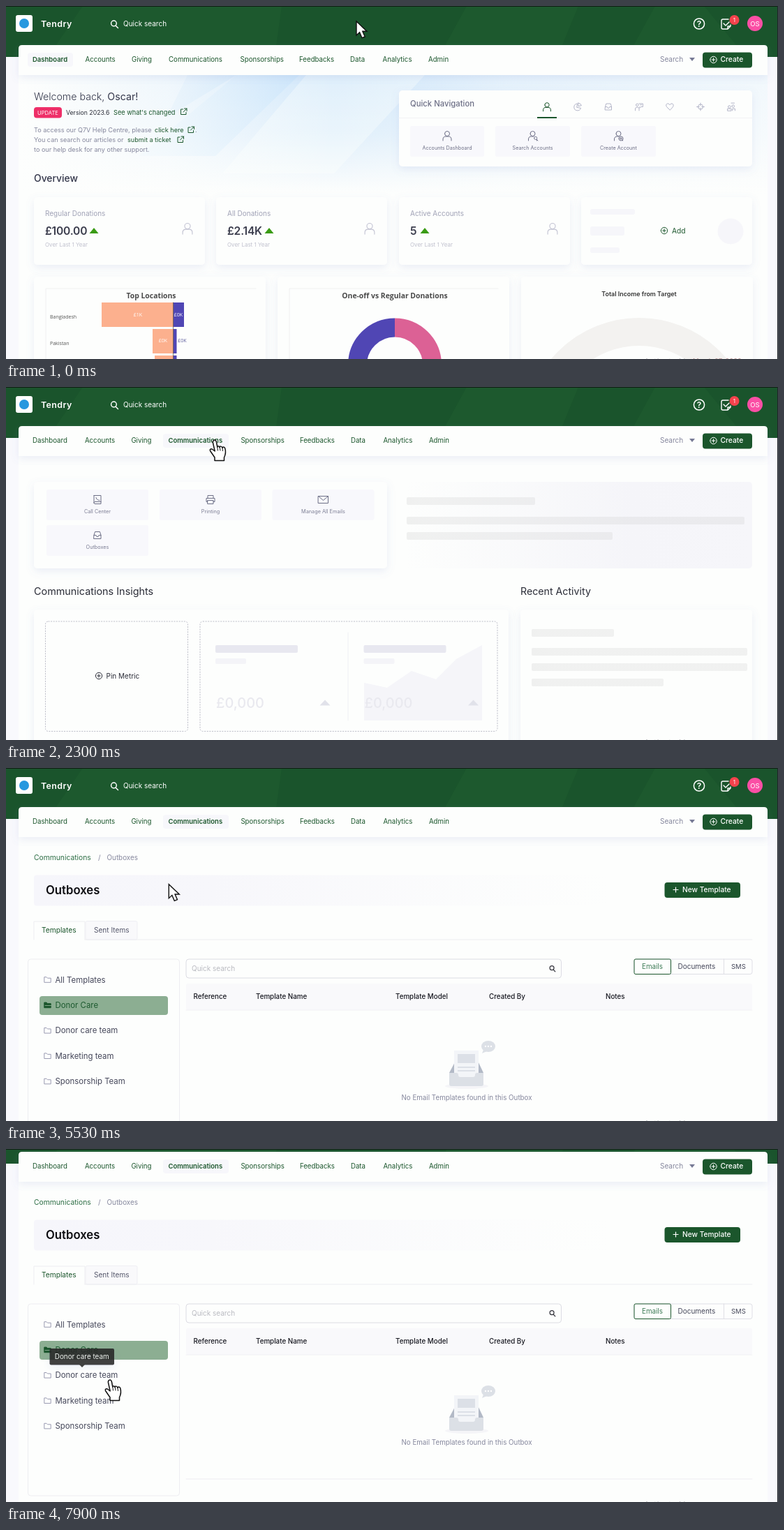
Animation, 1106 px wide and 506 px high, one loop 8000 ms. Source, as an HTML page:

```html
<!DOCTYPE html>
<html lang="en">
<head>
<meta charset="utf-8">
<title>Outboxes walkthrough</title>
<style>
html, body { margin: 0; width: 100%; height: 100%; overflow: hidden; background: #fdfefd; }
svg { display: block; width: 100vw; height: 100vh; }
text { font-family: Inter, sans-serif; white-space: pre; }
.alt { font-family: "Open Sans", sans-serif; }
</style>
</head>
<body>
<svg id="stage" viewBox="0 0 1106 506"></svg>
<script>
const GREEN = '#1b562c', WHITE = '#fdfefd', GREY = '#85879d', PALE = '#f8f8fc', INK = '#2b2d38', BLUE = '#318fe6';
const LOOP = 8000;

// Drawing helpers
const rect = (x, y, w, h, fill, r = 0, more = '') =>
  `<rect x="${x}" y="${y}" width="${w}" height="${h}" rx="${r}" fill="${fill}" ${more}/>`;
const text = (x, y, s, size, fill = INK, weight = 400, more = '') =>
  `<text x="${x}" y="${y}" font-size="${size}" fill="${fill}" font-weight="${weight}" ${more}>${s}</text>`;
const mid = (x, y, s, size, fill, weight, more = '') =>
  text(x, y, s, size, fill, weight, 'text-anchor="middle" ' + more);
const path = (d, fill, more = '') => `<path d="${d}" fill="${fill}" ${more}/>`;
const line = (d, color, w = 1, more = '') =>
  path(d, 'none', `stroke="${color}" stroke-width="${w}" stroke-linecap="round" stroke-linejoin="round" ${more}`);
const circle = (x, y, r, fill, more = '') => `<circle cx="${x}" cy="${y}" r="${r}" fill="${fill}" ${more}/>`;
const at = (x, y, s, k = 1) => `<g transform="translate(${x} ${y}) scale(${k})">${s}</g>`;
const group = (id, s) => `<g id="${id}">${s}</g>`;
const card = (x, y, w, h) => rect(x, y, w, h, WHITE, 5, 'filter="url(#shadow)"');
const bones = list => list.map(([x, y, w]) => rect(x, y, w, 11, 'url(#shimmer)', 2)).join('');

// Icons, centred on their own origin
const icon = {
  person: 'M-3.5-3A3.5 3.5 0 1 1 3.5-3A3.5 3.5 0 1 1-3.5-3M-6 7V5C-6 2-4 1-2 1H2C4 1 6 2 6 5V7',
  pie: 'M-1-5A5.5 5.5 0 1 0 5 2L-1 1ZM1-6V-1L6-2A5.5 5.5 0 0 0 1-6Z',
  box: 'M-5 0L-3.5-5H3.5L5 0V5H-5ZM-5 0H-2L-1 2H1L2 0H5',
  talk: 'M-5-3A2 2 0 1 1-1-3A2 2 0 1 1-5-3M-6 6V2Q-3-1 0 2V6M0-5H6V0H3L1 2V0M2-3H4',
  heart: 'M0 5L-5 0C-8-5-2-7 0-3C2-7 8-5 5 0Z',
  target: 'M-4 0A4 4 0 1 1 4 0A4 4 0 1 1-4 0M0-6V-2M0 6V2M-6 0H-2M6 0H2',
  people: 'M-5 0A2 2 0 1 1-1 0A2 2 0 1 1-5 0M-6 6V3H0V6ZM1-1A2 2 0 1 1 5-1A2 2 0 1 1 1-1M2 6V3H6V6M0-6H5',
  book: 'M-5-6H5V6H-4Q-6 4-4 3H5M-5-6V5M-2-3Q-1 1 3 1',
  printer: 'M-4-2V-6H4V-2M-4 3H-6V-2H6V3H4M-4 1H4V6H-4Z',
  mail: 'M-7-5H7V5H-7ZM-7-5L0 1L7-5',
  search: 'M-4-1A3.5 3.5 0 1 1 3-1A3.5 3.5 0 1 1-4-1M2 2L5 5',
  plus: 'M-4.7 0A4.7 4.7 0 1 1 4.7 0A4.7 4.7 0 1 1-4.7 0M-2.3 0H2.3M0-2.3V2.3',
  ext: 'M-1-3.5H-4V4H3.5V1M1-4.5H4.5V-1M4.5-4.5L-.5.5',
  folder: 'M-4.7 3.8V-3.8H-1.5L0-2.3H4.7V3.8Z'
};
const draw = (name, x, y, color, k = 1, w = 1) => at(x, y, line(icon[name], color, w), k);
const up = (x, y, color, w = 6.5) => path(`M${x - w} ${y + 4}L${x} ${y - 4}L${x + w} ${y + 4}Z`, color);

function defs() {
  const stop = (o, c, a = 1) => `<stop offset="${o}" stop-color="${c}" stop-opacity="${a}"/>`;
  return `<defs>
    <filter id="shadow" x="-10%" y="-20%" width="120%" height="150%"><feDropShadow dx="0" dy="4" stdDeviation="6" flood-color="#6a7cc4" flood-opacity=".13"/></filter>
    <linearGradient id="shimmer">${stop(.25, '#bebebe', .2)}${stop(.37, '#818181', .24)}${stop(.63, '#bebebe', .2)}</linearGradient>
    <linearGradient id="toRight">${stop(0, '#f5f5f9', 0)}${stop(.65, '#f5f5f9')}${stop(1, '#f6f6fa')}</linearGradient>
    <linearGradient id="toLeft">${stop(0, '#f6f6fb')}${stop(.25, '#f7f7fb')}${stop(.8, '#f9f9fc', 0)}</linearGradient>
    <linearGradient id="sky" x2="0" y2="1">${stop(0, '#cfe6fa')}${stop(.5, '#e0effb')}${stop(1, '#fdfefd')}</linearGradient>
    <linearGradient id="veil">${stop(0, '#fdfefd')}${stop(.2, '#fdfefd', .7)}${stop(.42, '#fdfefd', 0)}${stop(.65, '#fdfefd', .45)}${stop(1, '#fdfefd', .75)}</linearGradient>
  </defs>`;
}

function header() {
  const dark = d => path(d, '#0b3a1c', 'opacity=".14"');
  return rect(0, 0, 1106, 73, '#1d592e') +
    dark('M395 0H660L620 73H385Z') + dark('M820 0H930L890 73H790Z') + dark('M1000 0H1106V73H1060Z') + dark('M0 0H110L60 73H0Z') +
    rect(14, 13, 24, 24, '#fff', 3) + circle(26, 25, 7, '#2798df') +
    text(50, 30, 'Tendry', 12.4, '#fff', 600, 'letter-spacing=".4"') +
    draw('search', 155, 26, '#fff', 1.1, 1.3) + text(168, 29, 'Quick search', 10, '#fff') +
    circle(993, 25.5, 7.6, 'none', 'stroke="#fff" stroke-width="1.5"') + mid(993, 29.8, '?', 12, '#fff', 600) +
    line('M1038 27V29L1034 33H1027Q1025 33 1025 31V21Q1025 19 1027 19H1035M1028 25L1031 28L1036 23M1034 33V29H1038', '#fff', 1.4) +
    circle(1043.5, 20, 7, '#f5424c') + mid(1043.5, 23, '1', 8, '#fff') +
    circle(1073, 25, 11, '#fb4fa5') + mid(1073, 28.5, 'OS', 9.5, '#fff');
}

const NAV = [['Dashboard', 38], ['Accounts', 113.5], ['Giving', 180], ['Communications', 233], ['Sponsorships', 335.5],
  ['Feedbacks', 420], ['Data', 493], ['Analytics', 539.5], ['Admin', 605]];
function nav() {
  return path('M18 99V61Q18 56 23 56H1086Q1091 56 1091 61V99Z', WHITE, 'filter="url(#shadow)"') +
    `<rect id="pill" y="67" height="20" rx="4" fill="#f7f7fb"/>` +
    NAV.map(([s], i) => text(0, 80, s, 9.7, GREEN, 400, `id="nav${i}"`)).join('') +
    text(937, 80, 'Search', 10, GREY) + path('M979 74H987L983 79Z', '#777a95') +
    rect(998, 66.5, 71, 22, GREEN, 4) + draw('plus', 1013.5, 77, '#fff') + text(1023.5, 80.3, 'Create', 10.3, '#fff', 500);
}

function dashboard() {
  const sub = (y, a, x, b) => text(40, y, a, 9.1, GREY) + (b ? text(x, y, b, 9.1, GREEN) : '');
  const metric = (x, name, value, tri) => card(x, 274, 245, 97) + text(x + 16, 301, name, 10, '#a0a2b6') +
    text(x + 16, 328, value, 15.6, '#3b3d4d', 600, 'letter-spacing="-.2"') + up(tri, 322, '#3a9b14') +
    text(x + 16, 345, 'Over Last 1 Year', 8, '#c0c1ce') + draw('person', x + 220, 319, '#c3c4d3', 1.15);
  const tile = (x, w, kind, s) => rect(x, 172, w, 44, PALE, 3) + draw(kind, x + w / 2, 186, '#6d6f86') +
    mid(x + w / 2, 206, s, 7.2, '#6d6f86');
  const small = (x, y, s, fill) => mid(x, y, s, 7, fill, 400, 'class="alt"');
  const title = (x, s, size = 10.4) => mid(x, 419, s, size, '#4a4a4a', 700, 'class="alt"');
  const orange = '#fcb08e', violet = '#5046b4';
  return rect(18, 99, 1073, 170, 'url(#sky)') + path('M330 99H420L300 215H190Z', '#9fd0f8', 'opacity=".22"') +
    path('M430 99H600L470 240H310Z', WHITE, 'opacity=".35"') + path('M260 99H330L230 160Z', '#a5d0f5', 'opacity=".4"') +
    rect(18, 99, 1073, 171, 'url(#veil)') +
    text(40, 135, 'Welcome back, <tspan font-weight="400">Oscar!</tspan>', 14.2, '#33364a', 300) +
    rect(40, 145, 40, 15.5, '#ee2f68', 4) + mid(60, 155.7, 'UPDATE', 7.6, '#fff') +
    text(86, 155.5, 'Version 2023.6', 8.7) + text(154, 155.5, 'See what\'s changed', 9.2, GREEN) + draw('ext', 254.5, 151.5, GREEN) +
    sub(181, 'To access our Q7V Help Centre, please', 213, 'click here') + draw('ext', 265, 177.5, GREEN) + text(271, 181, '.', 9, GREY) +
    sub(195, 'You can search our articles or', 174, 'submit a ticket') + draw('ext', 250, 191.5, GREEN) +
    sub(209, 'to our help desk for any other support.') +
    text(40, 252, 'Overview', 13.9, '#33364a', 500) +
    card(563, 121, 506, 109) + text(579, 144, 'Quick Navigation', 11.3, '#6d6f86', 500) + line('M563 160.5H1069', '#f2f2f5') +
    ['person', 'pie', 'box', 'talk', 'heart', 'target', 'people'].map((k, i) =>
      draw(k, 775 + 44 * i, 144.5, i ? '#b3b5c8' : GREEN, .9, 1.1)).join('') + rect(761, 159, 28, 2, GREEN) +
    tile(579, 106, 'person', 'Accounts Dashboard') + tile(701, 107, 'person', 'Search Accounts') + tile(824, 107, 'person', 'Create Account') +
    circle(759, 189, 3, PALE) + draw('search', 759, 190, '#6d6f86', .6, 1.5) +
    circle(881, 189, 3, PALE) + draw('plus', 881, 190, '#6d6f86', .65, 1.5) +
    metric(40, 'Regular Donations', '£100.00', 126) + metric(301, 'All Donations', '£2.14K', 377) + metric(563, 'Active Accounts', '5', 600) +
    card(824, 274, 245, 97) + rect(837, 291, 64, 8, '#f6f6fa', 3) + rect(837, 316, 49, 13, '#f6f6fa', 3) + rect(837, 346, 42, 8, '#f6f6fa', 3) +
    circle(1038, 323, 18.5, '#f6f6fa') + draw('plus', 943, 322, GREEN) + text(954, 325.7, 'Add', 10.2, GREEN) +
    [40, 389, 738].map(x => card(x, 388, 332, 160)).join('') +
    line('M57 506V405H358M406 506V405H705', '#ececee', .8) +
    title(208, 'Top Locations') + title(557, 'One-off vs Regular Donations') + mid(907, 416, 'Total Income from Target', 8.9, '#333', 600) +
    text(63, 448, 'Bangladesh', 7, '#555', 400, 'class="alt"') + text(63, 486, 'Pakistan', 7, '#555', 400, 'class="alt"') +
    rect(137, 425, 103, 35, orange) + rect(240, 425, 15, 35, violet) + rect(210, 463, 30, 35, orange) + rect(240, 463, 4.5, 35, violet) +
    rect(213, 501, 27, 5, orange) + rect(240, 501, 4.5, 5, violet) + line('M239.5 425V506', '#444', .7) +
    small(189, 444.5, '£1K', '#fff') + small(247, 444.5, '£0K', '#fff') + small(225, 482, '£0K', '#fff') + small(252.5, 482, '£0K', '#5b5b9c') +
    line('M557 461A53.5 53.5 0 0 0 557 568', violet, 27, 'style="stroke-linecap:butt"') +
    line('M557 461A53.5 53.5 0 0 1 557 568', '#dc6195', 27, 'style="stroke-linecap:butt"') +
    circle(907, 611, 144, 'none', 'stroke="#f3f2f0" stroke-width="40"') +
    text(984, 511.5, 'March 07, 2022', 9.5, '#b58f8f');
}

function communications(ready) {
  const lift = ready ? 15 : 0, drop = ready ? 8 : 0, row2 = ready ? 194 : 198;
  const tile = (x, y, kind, s, id = '') => rect(x, y, 146, 44, PALE, 3, id) + draw(kind, x + 73, y + 14.5, '#6d6f86') +
    mid(x + 73, y + 33.5, s, 7.3, '#7d7f95');
  const figure = x => rect(x, 370, 118, 11, '#e8e8f0', 2) + rect(x, 389, 44, 8, '#f4f4f8', 2) +
    text(x + 1, 460, '£0,000', 20, '#e9e9ef', 500) + up(x + 157, 452.5, '#e1e2ea', 7.5);
  const dash = (x, w) => rect(x, 336, w, 157.5, 'none', 4, 'stroke="#b5b6c2" stroke-width=".9" stroke-dasharray="2 1.6"');
  const link = (y, s, x) => circle(593, y - 3, 1.4, '#6b7a99') + text(601, y, s, 8.45, BLUE) + draw('ext', x, y - 3.5, GREY, .85);
  const guide = rect(563, 121, 506, 147, 'url(#toRight)', 5) +
    text(574, 144.5, 'Getting Started with Communications', 11, '#174d28') +
    text(574, 163.5, 'Communications refer to all email or post correspondence which you have had with your', 8.4, GREY) +
    text(574, 176.5, 'donors (accounts), including automatically-generated correspondence.', 8.4, GREY) +
    link(198, 'Introduction to Communications', 747) + link(211, 'Printing document batches', 725) +
    link(224, 'Setting an automated trigger to dispatch emails or postal documents', 899) +
    text(574, 245, 'Learn more about Communications', 8.8, BLUE) + draw('ext', 731, 241.5, GREEN, .9) +
    circle(1017, 191, 26, '#fff', 'filter="url(#shadow)"') +
    line('M1005 192V188A12.5 12.5 0 0 1 1030 188V192M1030 198Q1029 204 1020 204', '#ff8a1c', 2) +
    rect(1003.5, 190, 5, 9, 'none', 2, 'stroke="#ff8a1c" stroke-width="2"') + rect(1026.5, 190, 5, 9, 'none', 2, 'stroke="#ff8a1c" stroke-width="2"') +
    rect(1014, 202, 7, 4, '#ff8a1c', 2) +
    line('M992 150L998 160M1048 205L1057 208', '#f8b5a8') + line('M979 217L982 212L985 217Z', '#e8d27a', .8) +
    path('M1042 161H1049L1045.5 166Z', '#59d3cf') + circle(1016, 229, 2.5, '#4aa8ee') + circle(988, 184, 2, '#cbb8f2') +
    circle(1020, 157, 1.8, 'none', 'stroke="#7bdcd7"') + rect(1036, 221, 4, 4, 'none', 0, 'stroke="#c9d4ee"') + line('M997 222L1004 217', '#bfe0a0');
  const waiting = rect(574, 136, 495, 124, 'url(#toRight)', 5) + bones([[574, 158, 184], [574, 186, 484], [574, 208, 295]]);
  const noData = `<ellipse cx="900" cy="394" rx="21" ry="4" fill="#f3f3f5"/>` +
    path('M884 380L890 369H910L916 380V393H884Z', WHITE, 'stroke="#d5d5d9"') + line('M884 380H894Q895 385 900 385T906 380H916', '#d5d5d9') +
    mid(900, 411.5, 'No Data', 9.8, '#7d7f90');
  const insights = text(40, 297.7, 'Communications Insights', 14.4) + text(737, 297.7, 'Recent Activity', 14.2) +
    card(40, 319, 680, 240) + card(737, 319, 332, 240) + dash(56.5, 204) + dash(278, 426) +
    draw('plus', 133, 414, INK) + text(143.5, 417.5, 'Pin Metric', 10) +
    path('M513 424L546 431L581 407L616 419L645 390L682 370V478H513Z', '#f5f5f9') + figure(300) + figure(512.5) + line('M490 352V478', '#f0f0f4') +
    (ready ? noData : bones([[753, 347, 118], [753, 374, 309], [753, 396, 309], [753, 418, 189]]));
  return card(40, ready ? 122 : 136, 506, ready ? 146 : 124) +
    tile(58, 147 - lift, 'book', 'Call Center') + tile(220, 147 - lift, 'printer', 'Printing') + tile(381.5, 147 - lift, 'mail', 'Manage All Emails') +
    tile(58, row2, 'box', 'Outboxes') + (ready ? rect(58, row2, 146, 44, GREEN, 3, 'id="hover" opacity="0"') : '') +
    (ready ? guide : waiting) + at(0, drop, insights);
}

function outboxes() {
  const row = (i, s) => { const y = 303.5 + 36.4 * i, on = i === 1;
    return (on ? rect(48, 327, 184, 27, '#8cae92', 4) : '') + at(59.5, y, path(icon.folder, on ? GREEN : 'none', `stroke="${on ? GREEN : '#9a9bb2'}"`)) +
      (on ? line('M56 340.5H66', '#8cae92', .9) : '') + text(70.5, y + 4, s, 11.4, on ? '#1d5a2f' : '#45475a'); };
  const empty = `<ellipse cx="660" cy="456" rx="31" ry="4" fill="#f5f5f8"/>` +
    path('M635 437L645 418H675L684 437Z', '#b2b9c6') + path('M642 405H677V445H642Z', '#f3f5f8') + rect(647, 410, 25, 13, '#dce0e7') +
    rect(647, 428, 25, 2, '#dce0e7') + rect(647, 433, 25, 2, '#dce0e7') +
    path('M635 437H645Q648 437 648 440T651 443H669Q672 443 672 440T675 437H684V453Q684 456 681 456H638Q635 456 635 453Z', '#dce0e6') +
    `<ellipse cx="691" cy="399" rx="10" ry="8" fill="#dce0e6"/>` + path('M684 404L682 409L689 406Z', '#dce0e6') +
    [687, 691, 695].map(x => circle(x, 399, 1.2, '#fff')).join('');
  return text(40, 131.7, 'Communications', 10.3, '#2d6e45') + text(132, 131.7, '/', 10, GREY) + text(144.5, 131.7, 'Outboxes', 9.9, GREY) +
    rect(40, 153.5, 1029, 44, 'url(#toLeft)', 4) + text(57, 180.5, 'Outboxes', 16.7, '#0c0c10', 600) +
    rect(943.5, 164, 108.5, 22, GREEN, 4) + line('M956 174.5H963M959.5 171V178', '#fff', 1.2) + text(969, 178, 'New Template', 10.2, '#fff', 500) +
    line('M40 246V220H113V246', '#ededf1') + rect(114, 219.5, 74, 26.5, '#f9f9fb', 2, 'stroke="#ededf1" stroke-width=".8"') + line('M113 246H1069', '#ededf1') +
    text(51, 236, 'Templates', 10.2, GREEN) + text(126, 236, 'Sent Items', 10.1, '#55576b') +
    rect(31.5, 274, 217, 275, WHITE, 4, 'stroke="#ededf1"') +
    group('bones', bones([[48, 302, 71], [48, 329.5, 184], [48, 351.5, 184], [48, 373.5, 113]])) +
    group('folders', ['All Templates', 'Donor Care', 'Donor care team', 'Marketing team', 'Sponsorship Team'].map((s, i) => row(i, s)).join('')) +
    rect(258, 274, 537.5, 27, WHITE, 4, 'stroke="#dcdce3"') + text(266, 290.5, 'Quick search', 10, '#b9bac0') + draw('search', 782.5, 287.5, '#33343c', .85, 1.4) +
    rect(900, 274, 169, 21.5, WHITE, 3, 'stroke="#dfdfe6"') + line('M1028.5 274V295', '#dfdfe6') + rect(900, 274, 52.5, 21.5, WHITE, 2, `stroke="${GREEN}"`) +
    text(911, 288.3, 'Emails', 9.8, '#3c7a55') + text(962.5, 288.3, 'Documents', 10, '#45475a') + text(1039, 288.3, 'SMS', 9.5, '#45475a') +
    group('table', rect(258, 309, 811, 38, '#f9f9fb', 3) + line('M258 347H1069', '#f1f1f4') +
      [['Reference', 268.5], ['Template Name', 358], ['Template Model', 558], ['Created By', 692], ['Notes', 859]]
        .map(([s, x]) => text(x, 331.3, s, 9.8, '#16171f', 500)).join('') +
      empty + mid(660, 476, 'No Email Templates found in this Outbox', 9.8, GREY) + line('M258 525H1069', '#ededf1')) +
    group('spinner', [[-1, -1, .6], [1, -1, .4], [1, 1, 1], [-1, 1, .75]].map(([x, y, o]) => circle(3.7 * x, 3.7 * y, 2.4, GREEN, `opacity="${o}"`)).join(''));
}

const tooltip = () => rect(62.5, 286, 92.5, 23.5, '#262626', 2, 'filter="url(#shadow)"') + path('M105 309H113L109 313Z', '#262626') +
  mid(108.7, 301, 'Donor care team', 9.9, '#fff');

const arrow = path('M0 0V20L4.6 15.7L8 23.7L12.2 22L8.8 14.3H15Z', '#fff', 'stroke="#111" stroke-width="1.4"');
const hand = path('M0 0C-2 0-3 2-2.5 4L.2 16L-3 13.5C-5 12-7.5 13-6.5 15.5L0 25V29.5H13.5V25C16 20 16 16 14.8 12C14 9.5 11 9.5 11 11.5C10.5 8.5 7 8.5 7 10.5C6 8 3.6 8.5 3.8 10L2.5 3C2 1 1 0 0 0Z',
  '#fff', 'stroke="#111" stroke-width="1.5" stroke-linejoin="round"') + line('M3.8 10L4.5 15M7.2 10.5L8 15M11 11.5L11.5 15.5', '#111');

const stage = document.getElementById('stage');
stage.innerHTML = defs() + rect(0, 0, 1106, 506, '#f9f9fd') +
  group('page', header() + rect(18, 73, 1073, 600, WHITE) + group('dash', dashboard()) + group('commWait', communications(false)) +
    group('commReady', communications(true)) + group('outbox', outboxes()) + nav()) +
  text(914, 513.5, 'Activate Licence', 12.6, '#b4b4b8', 400, 'class="alt"') +
  group('tip', tooltip()) + rect(0, 0, 1106, 1, '#101c14') + rect(1105, 0, 1, 506, '#20242a') +
  group('arrow', arrow) + group('hand', hand);

const $ = {};
stage.querySelectorAll('[id]').forEach(el => $[el.id] = el);
const set = (id, name, value) => $[id].setAttribute(name, value);
const show = (id, on) => set(id, 'display', on ? 'inline' : 'none');
const ramp = (t, a, b) => Math.min(1, Math.max(0, (t - a) / (b - a)));
const easeOut = (u, k) => 1 - (1 - u) ** k;
const smooth = u => u * u * (3 - 2 * u);
const bezier = (s, p) => [0, 1].map(i =>
  (1 - s) ** 3 * p[0][i] + 3 * s * (1 - s) ** 2 * p[1][i] + 3 * s * s * (1 - s) * p[2][i] + s ** 3 * p[3][i]);

function pointer(t) {
  if (t < 2830) return bezier(easeOut(smooth(ramp(t, 470, 1430)), 1.2), [[502, 22], [440, 60], [340, 130], [299, 76]]);
  if (t < 5530) return bezier(easeOut(ramp(t, 2830, 3030), 5), [[299, 76], [249, 140], [199, 208], [149, 218]]);
  if (t < 7070) return bezier(easeOut(ramp(t, 5530, 5800), 1.7), [[232, 168], [300, 95], [385, 280], [415, 399]]);
  return bezier(easeOut(smooth(ramp(t, 7070, 7630)), 1.3), [[415, 399], [350, 415], [220, 425], [149, 331]]);
}

function render(t) {
  show('dash', t < 2030);
  show('commWait', t >= 2030 && t < 2430);
  show('commReady', t >= 2430 && t < 3230);
  show('outbox', t >= 3230);
  set('page', 'transform', `translate(0 ${-52 * easeOut(ramp(t, 6465, 6930), 1.6)})`);

  const [x, y] = pointer(t);
  const overNav = t < 2830 && x < 318 && y < 92;
  const pointing = overNav || (t >= 2830 && t < 5530) || (t > 7070 && x < 232);
  show('arrow', !pointing);
  show('hand', pointing);
  set(pointing ? 'hand' : 'arrow', 'transform', `translate(${x} ${y})`);

  const active = t < 2160 ? 0 : 3;
  NAV.forEach(([, left], i) => {
    const shift = i > 3 && (overNav || active) ? .9 : active && i > 0 && i < 4 ? -.6 : 0;
    set('nav' + i, 'x', left + shift);
    set('nav' + i, 'font-weight', i === active ? 600 : 400);
    set('nav' + i, 'font-size', i === active ? 9.5 : 9.7);
    set('nav' + i, 'fill', i === 3 && overNav && !active ? '#4f8a68' : GREEN);
  });
  set('pill', 'x', active ? 225 : 31);
  set('pill', 'width', active ? 94 : 65);
  set('hover', 'opacity', .5 * ramp(t, 2845, 2900));

  const p = (t < 3230 ? t - 2030 : t - 3230) / 1400 % 1;
  set('shimmer', 'x1', -3 + 3 * p);
  set('shimmer', 'x2', 1 + 3 * p);
  show('bones', t < 4400);
  show('folders', t >= 4400);
  const loaded = smooth(ramp(t, 4730, 5030));
  set('table', 'opacity', .35 + .65 * loaded);
  set('spinner', 'opacity', 1 - loaded);
  set('spinner', 'transform', `translate(664 417.5) rotate(${45 + (t - 3230) * .3})`);

  const pop = ramp(t, 7770, 7900), k = .8 + .2 * easeOut(pop, 2);
  set('tip', 'opacity', .88 * pop);
  set('tip', 'transform', `translate(${109 * (1 - k)} ${312 * (1 - k)}) scale(${k})`);
}

function frame() {
  render(performance.now() % LOOP);
  requestAnimationFrame(frame);
}
frame();
</script>
</body>
</html>
```
